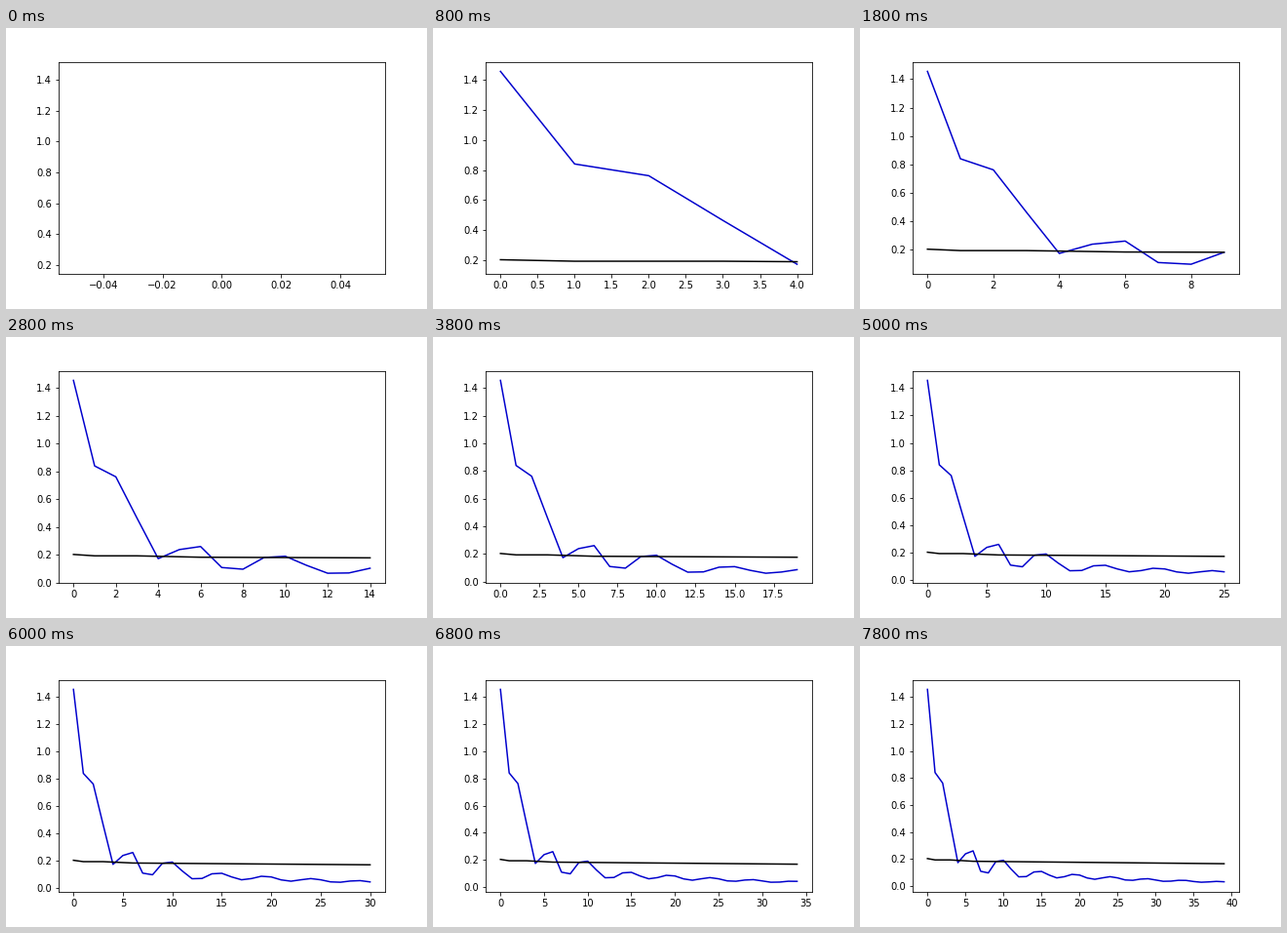
A matplotlib script for the animation above (8 s loop, 432 by 288 pixels).

```python
import numpy as np
import matplotlib.pyplot as plt
from matplotlib.animation import FuncAnimation

STEPS = 40
x = np.arange(STEPS)

# Fast curve: a steep drop through key points, then a damped ripple.
HEAD = [1.455, 0.840, 0.762, 0.465, 0.174, 0.239, 0.261,
        0.110, 0.098, 0.182, 0.191, 0.126, 0.069, 0.071]
trend = 0.092 * np.exp(-0.045 * (x - 14))
ripple = 0.023 * np.exp(-0.07 * (x - 14.5)) * np.cos(2 * np.pi * (x - 14.75) / 4.72)
fast = trend + ripple
fast[:len(HEAD)] = HEAD

# Slow curve: a short dip, then a nearly flat descent.
slow = np.interp(x, [0, 1, 3, 6, 39], [0.204, 0.194, 0.194, 0.184, 0.166])

plt.rcParams.update({"font.family": "DejaVu Sans", "font.size": 10})
fig, ax = plt.subplots(figsize=(6, 4), dpi=72)
fig.subplots_adjust(left=0.125, right=0.9, bottom=0.125, top=0.88)


def draw(step):
    ax.clear()
    n = step + 1
    ax.plot(x[:n], fast[:n], color="mediumblue", lw=1.5)
    ax.plot(x[:n], slow[:n], color="black", lw=1.5)
    return ax.lines


anim = FuncAnimation(fig, draw, frames=STEPS, init_func=lambda: draw(0),
                     interval=200, repeat=True, repeat_delay=0)
plt.show()
```
